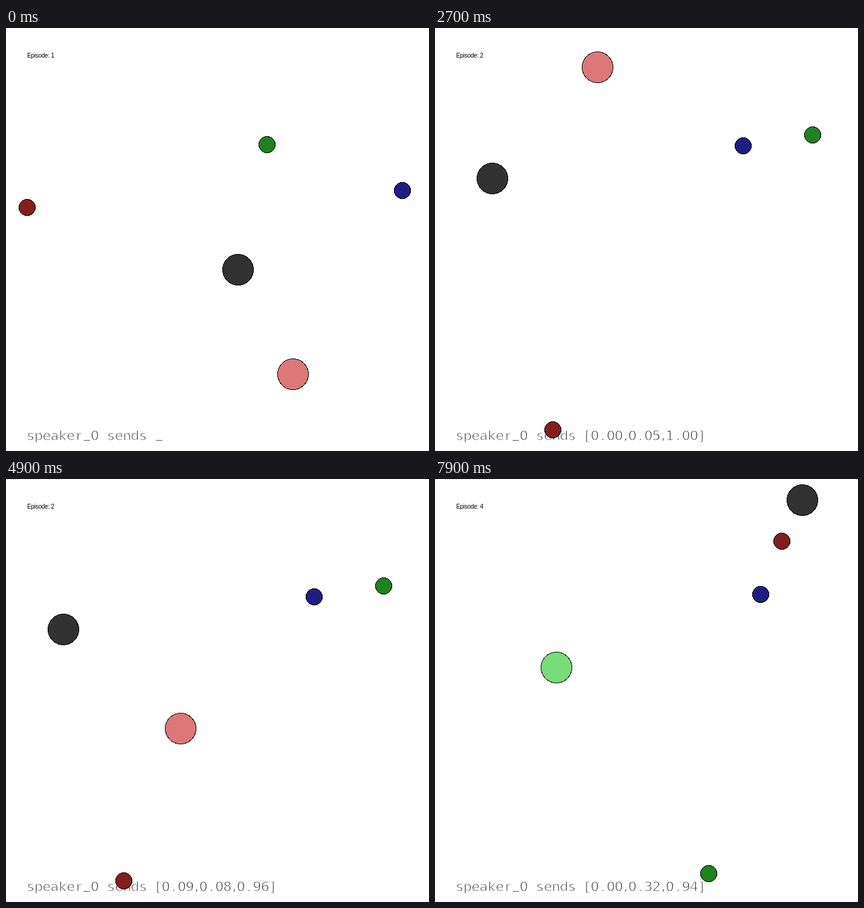
Write an HTML page that moves like this. It is 700 by 700 pixels and loops after 8 s.

```html
<!DOCTYPE html>
<html lang="en">
<head>
<meta charset="utf-8">
<title>Speaker and listener</title>
<style>
  html, body { margin: 0; width: 100%; height: 100%; overflow: hidden; background: #fff; }
  svg { display: block; width: 100vw; height: 100vh; }
  circle { stroke: #000; stroke-width: 1; shape-rendering: crispEdges; }
  #label { font: 10px "Liberation Sans", Arial, sans-serif; letter-spacing: -0.25px; fill: #000; }
  /* The white outline thins the strokes of the letters. */
  #message { font: 22px "DejaVu Sans", sans-serif; fill: #333; stroke: #fff; stroke-width: 0.9; text-anchor: middle; }
</style>
</head>
<body>
<svg viewBox="0 0 700 700">
  <circle id="speaker" r="25.5" fill="rgb(50,50,50)"/>
  <text id="message"></text>
  <circle id="listener" r="25.5"/>
  <circle id="red" r="13.5" fill="rgb(130,30,30)"/>
  <circle id="green" r="13.5" fill="rgb(30,130,30)"/>
  <circle id="blue" r="13.5" fill="rgb(30,30,130)"/>
  <text id="label" x="35" y="49"></text>
</svg>
<script>
const STEP_MS = 100, STEPS = 80, EPISODE_STEPS = 25;
const PINK = 'rgb(220,120,120)', LIME = 'rgb(120,220,120)';
const $ = id => document.getElementById(id);

// path: a few [step, x, y] key points of the listener
const episodes = [
  { color: PINK, speaker: [384, 400], red: [35, 297], green: [432, 193], blue: [656, 269],
    path: [[0, 475, 573], [10, 472, 365], [19, 492, 362]] },
  { color: PINK, speaker: [95, 249], red: [195, 665], green: [625, 177], blue: [510, 195],
    path: [[0, 272, 36], [9, 251, 337], [11, 252, 381], [24, 289, 413]] },
  { color: PINK, speaker: [462, 330], red: [633, 647], green: [538, 665], blue: [582, 341],
    path: [[0, 405, 545], [4, 435, 615], [15, 502, 630], [24, 496, 618]] },
  { color: LIME, speaker: [608, 35], red: [574, 103], green: [453, 653], blue: [539, 191],
    path: [[0, 140, 235], [4, 201, 312]] }
];

function random(seed) {
  const v = Math.sin(seed * 127.1 + 11.7) * 43758.5453;
  return v - Math.floor(v);
}

// The speaker names the third channel, with noise clipped to 0..1.
function message(step) {
  const noisy = (level, spread, k) => {
    const v = level + spread * (random(step * 3 + k) - 0.5);
    return Math.min(1, Math.max(0, v)).toFixed(2);
  };
  return `[${noisy(0.02, 0.16, 0)},${noisy(0.15, 0.36, 1)},${noisy(0.97, 0.08, 2)}]`;
}

// Monotone cubic curve through the key points, at rest at both ends.
function along(path, step) {
  const s = Math.min(step, path[path.length - 1][0]);
  const i = Math.max(0, path.findIndex(p => p[0] >= s) - 1);
  const a = path[i], b = path[i + 1], h = b[0] - a[0], u = (s - a[0]) / h;
  const tangent = (j, k) => {
    if (j === 0 || j === path.length - 1) return 0;
    const rate = n => (path[n + 1][k] - path[n][k]) / (path[n + 1][0] - path[n][0]);
    const before = rate(j - 1), after = rate(j);
    return before * after > 0 ? 2 * before * after / (before + after) : 0;
  };
  return [1, 2].map(k => {
    const d = b[k] - a[k], m = tangent(i, k) * h, n = tangent(i + 1, k) * h;
    return Math.round(a[k] + u * (m + u * (3 * d - 2 * m - n + u * (m + n - 2 * d))));
  });
}

function place(id, [x, y]) {
  $(id).setAttribute('cx', x);
  $(id).setAttribute('cy', y);
}

function advance(c) {
  if (c === ',') return 9;
  return c === '[' || c === ']' ? 11 : 13.3;
}

function write(text) {
  const xs = [], ys = [];
  let x = 34;
  for (const c of text) {
    xs.push((x + advance(c) / 2).toFixed(2));
    ys.push(c === '_' ? 677.5 : 682);
    x += advance(c);
  }
  const line = $('message');
  line.textContent = text;
  line.setAttribute('x', xs.join(' '));
  line.setAttribute('y', ys.join(' '));
}

function draw(step) {
  const index = Math.floor(step / EPISODE_STEPS), local = step % EPISODE_STEPS;
  const episode = episodes[index];
  for (const id of ['speaker', 'red', 'green', 'blue']) place(id, episode[id]);
  place('listener', along(episode.path, local));
  $('listener').setAttribute('fill', episode.color);
  $('label').textContent = `Episode: ${index + 1}`;
  write(`speaker_0 sends ${local ? message(step) : '_'}`);
}

const start = performance.now();
let shown = -1;
function tick() {
  const step = Math.floor((performance.now() - start) / STEP_MS) % STEPS;
  if (step !== shown) draw(shown = step);
  requestAnimationFrame(tick);
}
tick();
</script>
</body>
</html>
```
